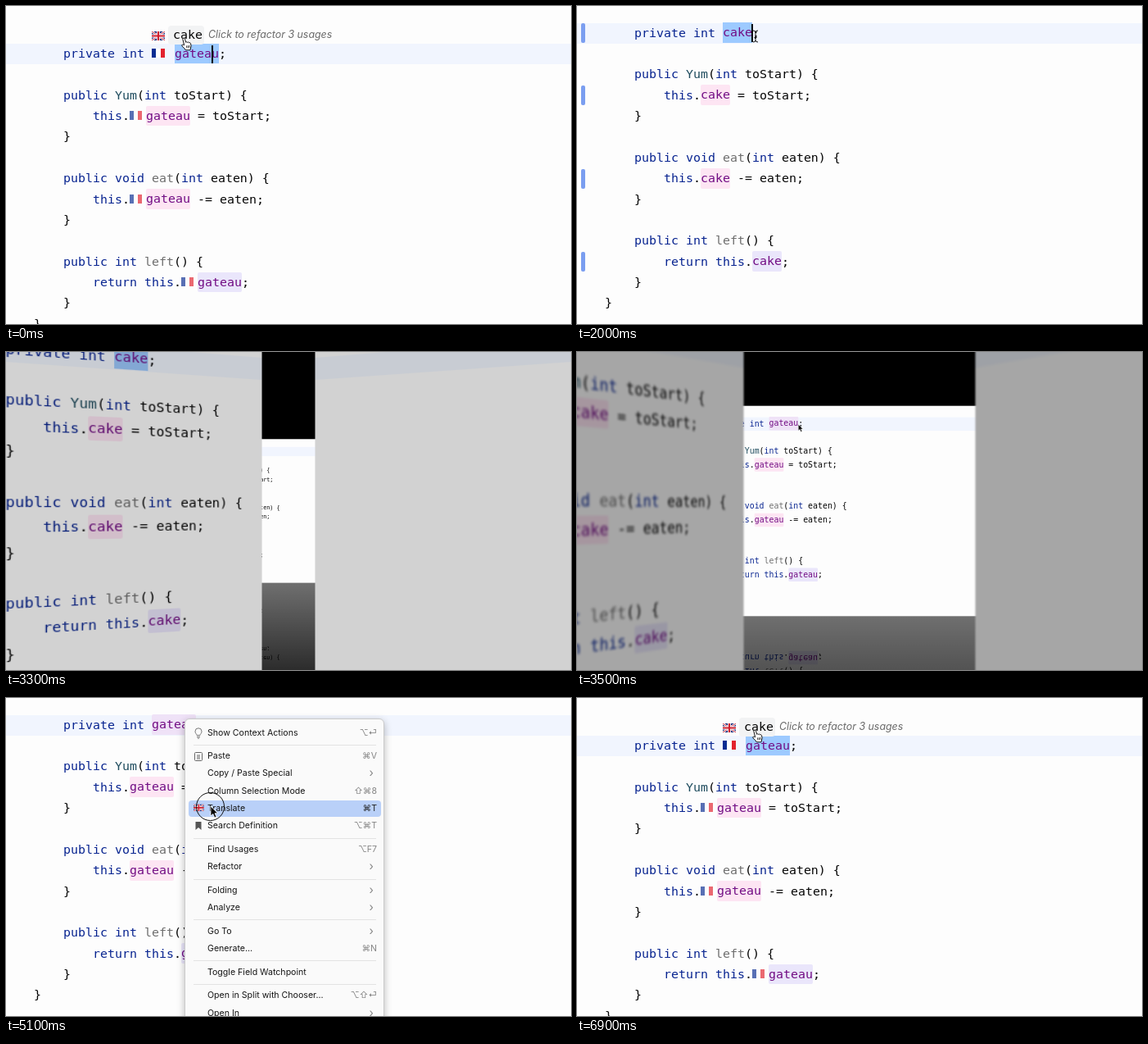
An HTML page that plays this animation: 690x388 px, repeating every 7 s.

```html
<!DOCTYPE html>
<html lang="en">
<head>
<meta charset="utf-8">
<title>Rename a field by translation</title>
<style>
html, body { margin: 0; width: 100%; height: 100%; overflow: hidden; background: #000; }
#stage { position: relative; width: 690px; height: 388px; overflow: hidden; background: #000; perspective: 1000px; }
#stage div { position: absolute; }
.cam, .scene { left: 0; top: 0; width: 690px; height: 388px; }
.scene { background: #fdfdfd; overflow: hidden; }
.row { left: 0; width: 690px; height: 25.4px; background: #f1f5fe; }
.line { font: 14.95px/25.4px "DejaVu Sans Mono", monospace; white-space: pre; color: #050505; }
.kw { color: #082490; }
.cls { color: #1f4c5e; }
.unused { color: #6e6e6e; }
.field { color: #720d84; padding: 3.4px 0; border-radius: 2px; }
.write { background: #fde5f3; }
.read { background: #eae6fb; }
.decl { background: #efe2f7; }
.sel { background: #9dcaff; border-radius: 0; }
.fr { display: inline-block; height: 11px; background: linear-gradient(90deg, #0b2d92 33.3%, #fff 33.3% 66.6%, #e2222e 66.6%); }
.big { width: 16px; margin-right: 12px; }
.small { width: 15px; margin-right: 5px; opacity: .68; }
.caret { width: 2px; height: 22px; background: #000; }
.mark { left: 5px; width: 5px; height: 24px; border-radius: 2px; background: #7b9ef0; }
.chip { left: 198px; top: 24px; width: 44px; height: 23px; border-radius: 4px; background: #f2f3f4; }
.hint { left: 247px; top: 25px; font: italic 12.4px/20px Inter, sans-serif; color: #6a6a6a; white-space: pre; }
.mirror { left: 0; top: 388px; width: 690px; height: 388px; }
.shade { inset: 0; background: linear-gradient(rgba(0,0,0,.56), #000); }
.door { top: 0; width: 345px; height: 388px; overflow: hidden; }
.menu { left: 219px; top: 26px; width: 242px; height: 380px; border-radius: 6px; background: #fafafa;
  border: 1px solid #cbcbcb; margin: -1px; box-shadow: 0 3px 10px rgba(0,0,0,.28); }
.item { left: 4px; width: 235px; height: 20px; border-radius: 4px; font: 10.6px/20px Inter, sans-serif; color: #161616; }
.item.on { background: #b9d0f8; }
.label { left: 23px; white-space: pre; }
.keys { right: 5px; color: #858585; font-family: Inter, "DejaVu Sans", sans-serif; white-space: pre; }
.on .keys { color: #222; }
.more { right: 9px; font-size: 14px; line-height: 18px; }
.item svg { position: absolute; left: 6px; top: 3px; }
.rule { left: 10px; width: 223px; height: 1px; background: #e3e3e3; }
.ring { width: 33px; height: 33px; margin: -18px; border: 1.5px solid #111; border-radius: 50%; }
</style>
</head>
<body>
<div id="stage"></div>
<script>
const LOOP = 7000, STEP = 100, LINE = 25.38;
const stage = document.getElementById('stage');

function add(parent, cls, html = '', css = {}) {
  const e = document.createElement('div');
  e.className = cls;
  e.innerHTML = html;
  Object.assign(e.style, css);
  parent.append(e);
  return e;
}
const px = n => n + 'px';
const span = (cls, s = '') => `<span class="${cls}">${s}</span>`;
const kw = s => span('kw', s);
const svg = (w, h, body) =>
  `<svg width="${w}" height="${h}" viewBox="0 0 ${w} ${h}">${body}</svg>`;

const ukFlag = svg(16, 11, `<rect width="16" height="11" fill="#1d2f7c"/>
  <path d="M0 0L16 11M16 0L0 11" stroke="#fff" stroke-width="2.4"/>
  <path d="M0 0L16 11M16 0L0 11" stroke="#d0202f" stroke-width=".9"/>
  <path d="M8 0V11M0 5.5H16" stroke="#fff" stroke-width="3.8"/>
  <path d="M8 0V11M0 5.5H16" stroke="#d0202f" stroke-width="2.2"/>`);
const bulb = (fill, line) => svg(12, 14, `<path d="M4 9.5C4 8 2 7.2 2 4.8a4 4 0 0 1 8 0C10 7.2 8 8 8 9.5Z"
  fill="${fill}" stroke="${line}"/><path d="M4 11.5H8M4.8 13.2H7.2" stroke="#777"/>`);

function scene(parent, { name, y, decl, flags, left = 0 }) {
  const s = add(parent, 'scene', '', { left: px(left) });
  const field = cls => span('field ' + cls, name);
  const self = cls => kw('this') + '.' + (flags ? span('fr small') : '') + field(cls);
  add(s, 'row', '', { top: px(y - 12.7) });
  [
    [0, 70, kw('private int ') + (flags ? span('fr big') : '') + field(decl) + ';'],
    [2, 70, `${kw('public')} ${span('cls', 'Yum')}(${kw('int')} toStart) {`],
    [3, 106, self('write') + ' = toStart;'],
    [4, 70, '}'],
    [6, 70, `${kw('public void')} ${span('unused', 'eat')}(${kw('int')} eaten) {`],
    [7, 106, self('write') + ' -= eaten;'],
    [8, 70, '}'],
    [10, 70, `${kw('public int')} ${span('unused', 'left')}() {`],
    [11, 106, kw('return ') + self('read') + ';'],
    [12, 70, '}'],
    [13, 34, '}']
  ].forEach(([n, x, html]) => add(s, 'line', html, { left: px(x), top: px(y + n * LINE - 12.7) }));
  return s;
}
const caretAt = (s, x, y) => add(s, 'caret', '', { left: px(x - 1), top: px(y - 11) });

// Editor before and after the translation
const cam = add(stage, 'cam');
const plain = { name: 'gateau', y: 33.2, decl: 'decl' };
const mirror = add(cam, 'mirror');
scene(mirror, plain).style.transform = 'scaleY(-1)';
add(mirror, 'shade');
const french = scene(cam, plain);
const frenchCaret = caretAt(french, 196, 33);
const offer = scene(cam, { name: 'gateau', y: 58.6, decl: 'sel', flags: true });
const offerCaret = caretAt(offer, 251.5, 58.5);
const chip = add(offer, 'chip');
add(offer, '', ukFlag, { left: '178px', top: '31px', lineHeight: 0 });
add(offer, 'line', 'cake', { left: '204px', top: '23.3px' });
const hint = add(offer, 'hint', 'Click to refactor 3 usages');

// Context menu; '-' is a separator, '>' a submenu
const icons = {
  'Show Context Actions': bulb('none', '#777'),
  'Paste': svg(12, 14, `<rect x="1.5" y="2.5" width="9" height="10" rx="1" fill="none" stroke="#666"/>
    <path d="M4 2.5H8M4 6H8M4 8H8M4 10H8" stroke="#666"/>`),
  'Translate': svg(16, 14, `<g transform="translate(0 1.5) scale(.8)">${ukFlag}</g>`),
  'Search Definition': svg(12, 14, '<path d="M2.5 2H9.5V12L6 9L2.5 12Z" fill="#555"/>')
};
const menu = add(cam, 'menu');
const items = [];
let rowY = 42.5;
for (const entry of ['Show Context Actions|⌥⏎', '-', 'Paste|⌘V', 'Copy / Paste Special|>',
  'Column Selection Mode|⇧⌘8', 'Translate|⌘T', 'Search Definition|⌥⌘T', '-', 'Find Usages|⌥F7',
  'Refactor|>', '-', 'Folding|>', 'Analyze|>', '-', 'Go To|>', 'Generate...|⌘N', '-',
  'Toggle Field Watchpoint|', '-', 'Open in Split with Chooser...|⌥⇧⏎', 'Open In|>']) {
  if (entry === '-') {
    add(menu, 'rule', '', { top: px(rowY - 33) });
    rowY += 7.3;
    continue;
  }
  const [text, keys] = entry.split('|');
  const e = add(menu, 'item', icons[text] || '', { top: px(rowY - 36) });
  add(e, 'label', text);
  add(e, keys === '>' ? 'keys more' : 'keys', keys === '>' ? '›' : keys);
  items.push({ e, y: rowY });
  rowY += 21.3;
}

// Pointers
const ring = add(cam, 'ring');
const arrow = add(cam, '', svg(12, 17, `<path d="M1 1V13L3.8 10.4L5.8 15L8 14L6 9.7H9.6Z"
  fill="#000" stroke="#fff" stroke-width=".8"/>`));
const hand = add(cam, '', svg(15, 17, `<path d="M4.6 9.5L2.9 2.6Q2.9 1 4.2 1Q5.1 1 5.5 2.3L6.5 6.2
  Q7.6 5.3 8.4 6.4Q9.5 5.5 10.4 6.7Q11.8 6.1 12.4 7.5Q13.8 11 12.6 13L12 15.8H6.4Q5.2 13.4 2.2 11.2
  Q1.2 9.6 2.4 9.1Q3.4 8.8 4.6 9.9Z" fill="#fff" stroke="#111"/>
  <path d="M7.4 10.4L7.8 13.2M9.2 10.2L9.5 13M11 10L11.1 12.8" stroke="#111" stroke-width=".8"/>`),
  { left: '213px', top: '38px' });

// Renamed code, split into two doors
const doors = [0, 345].map(x => add(stage, 'door', '',
  { left: px(x), transformOrigin: x ? '100% 50%' : '0 50%' }));
const cake = { name: 'cake', y: 33.2, decl: 'sel' };
const renamed = scene(doors[0], cake);
scene(doors[1], { ...cake, left: -345 });
[0, 3, 7, 11].forEach(n => add(renamed, 'mark', '', { top: px(21.2 + n * LINE) }));
const cakeCaret = caretAt(renamed, 214, 33);
const beam = add(renamed, '', svg(8, 16,
  '<path d="M1 1Q4 1 4 3Q4 1 7 1M4 2.5V13.5M1 15Q4 15 4 13Q4 15 7 15M2.5 9.5H5.5" fill="none" stroke="#111"/>'),
  { left: '214px', top: '29px' });
const tip = add(renamed, '', bulb('#f2b134', '#e39b1c'), { left: '40px', top: '24px' });

const clamp = x => Math.min(1, Math.max(0, x));
const ease = x => x * x * (3 - 2 * x);
const within = (t, ...spans) => spans.some(([a, b]) => t >= a && t < b);
const show = (e, on) => { e.style.display = on ? '' : 'none'; };

const path = [[3500, 232, 34], [3900, 219, 32], [4300, 219, 32], [4900, 250, 132],
  [5800, 250, 132], [6500, 217, 40]];
function pointer(t) {
  const i = path.findIndex(k => k[0] > t);
  if (i === 0) return path[0].slice(1);
  if (i < 0) return path[path.length - 1].slice(1);
  const [a, b] = [path[i - 1], path[i]];
  const k = ease((t - a[0]) / (b[0] - a[0]));
  return [a[1] + (b[1] - a[1]) * k, a[2] + (b[2] - a[2]) * k];
}

function render(t) {
  const isOffer = t < 1900 || t >= 5400;
  const hover = t < 1900 || t >= 6400;
  const p = ease(clamp((t - 2858) / 1087) ** 1.2);
  const moving = p > 0 && p < 1;

  show(offer, isOffer);
  show(french, !isOffer);
  show(offerCaret, within(t, [0, 200], [700, 1200], [5400, 5900], [6400, 6900]));
  show(frenchCaret, within(t, [3700, 4200]));
  show(chip, hover);
  show(hint, hover);
  cam.style.transform = moving ? `scale(${0.252 + 0.748 * p})` : 'none';
  show(mirror, moving);

  const [x, y] = pointer(t);
  show(hand, hover);
  show(arrow, !hover);
  arrow.style.left = px(x - 1);
  arrow.style.top = px(y - 1);

  show(menu, within(t, [4200, 5400]));
  menu.style.opacity = t >= 5300 ? 0.5 : 1;
  for (const it of items)
    it.e.classList.toggle('on', within(t, [4400, 5300]) && Math.abs(it.y - y) < 10.65);

  show(ring, within(t, [1600, 1700], [4100, 4200], [5100, 5200]));
  ring.style.left = px(t < 1900 ? 218 : x);
  ring.style.top = px(t < 1900 ? 42 : y + 1);

  const still = t < 2800;
  show(cakeCaret, still);
  show(beam, still);
  show(tip, !still);
  doors.forEach((d, i) => {
    show(d, t >= 1900 && p < 1);
    d.style.transform = moving
      ? `translateZ(${p * (850 - 170 * p)}px) rotateY(${(i ? -90 : 90) * p}deg)` : 'none';
    d.style.filter = moving ? `brightness(${1 - 0.63 * p}) blur(${1.8 * p}px)` : 'none';
  });
}

const start = performance.now();
function tick() {
  const t = (performance.now() - start) % LOOP;
  render(Math.floor(t / STEP) * STEP);
  requestAnimationFrame(tick);
}
tick();
</script>
</body>
</html>
```
